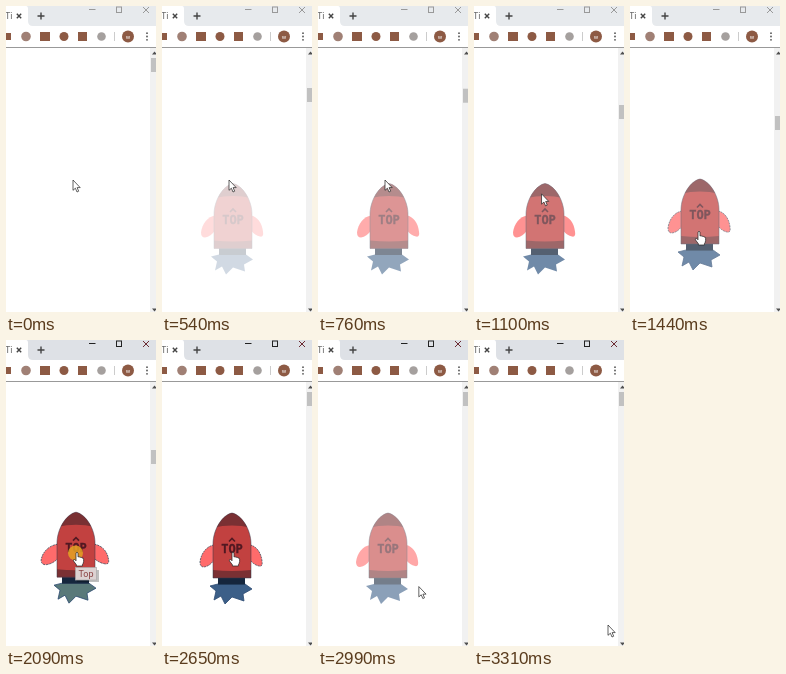
Recreate the animation shown at these times as an HTML page. Size 150 px wide and 306 px high, loop 3.43 s.

```html
<!DOCTYPE html>
<html lang="en">
<head>
<meta charset="utf-8">
<title>Back to top rocket</title>
<style>
  html, body { margin: 0; width: 100%; height: 100%; overflow: hidden; background: #fff; }
  svg { display: block; width: 150px; height: 306px; }
  .ui { font-family: Roboto, sans-serif; }
  .top { font: bold 12px "DejaVu Sans Mono", monospace; }
  .line { fill: none; stroke-width: 1; }
  .bold { fill: none; stroke: #444; stroke-width: 1.4; }
  .wing { fill: #ff6b6b; stroke-width: .7; stroke-dasharray: 2 .8; }
</style>
</head>
<body>
<svg viewBox="0 0 150 306">
  <defs>
    <path id="body" d="M51 238V204C51 190 60 175 70 173C80 175 89 190 89 204V238Z"/>
    <clipPath id="hull"><use href="#body"/></clipPath>
  </defs>
  <rect width="150" height="306" fill="#fff"/>

  <!-- browser bar -->
  <rect id="strip" width="150" height="20"/>
  <path d="M0 0H20Q22 0 22 3V15Q22 20 27 20H0Z" fill="#fff"/>
  <text class="ui" x="-1" y="13" font-size="9" fill="#666">Ti</text>
  <path class="bold" d="M10.8 7.8L15.2 12.2M15.2 7.8L10.8 12.2"/>
  <path class="bold" d="M31.5 10H38.5M35 6.5V13.5"/>
  <g id="controls" class="line">
    <path d="M83 3.5H89.5"/>
    <rect x="110.5" y="1" width="5" height="5.5"/>
    <path id="close" d="M137 1L143 7M143 1L137 7"/>
  </g>
  <g fill="#8d5a44">
    <rect x="-3" y="27" width="8" height="7"/>
    <circle cx="20" cy="30.5" r="4.8" fill="#a08075"/>
    <rect x="34" y="26" width="10" height="9"/>
    <circle cx="58" cy="30.5" r="4.5"/>
    <rect x="72" y="26" width="9" height="9"/>
    <circle cx="95.5" cy="30.5" r="4.3" fill="#a5a09e"/>
    <circle cx="122" cy="30.5" r="6"/>
  </g>
  <path class="line" d="M108.5 26V35" stroke="#ccc"/>
  <text class="ui" x="122" y="32.5" font-size="6" text-anchor="middle" fill="#fff">w</text>
  <g fill="#555">
    <circle cx="141" cy="27.2" r=".9"/><circle cx="141" cy="30.5" r=".9"/><circle cx="141" cy="33.8" r=".9"/>
  </g>
  <path class="line" d="M0 41.5H150" stroke="#999"/>

  <!-- scrollbar -->
  <rect x="144" y="42" width="6" height="264" fill="#f1f1f1"/>
  <path d="M146 48.5L148.5 45.5L151 48.5ZM146 302.5L148.5 305.5L151 302.5Z" fill="#505050"/>
  <rect id="thumb" x="145" width="5" height="14" fill="#c1c1c1"/>

  <g id="rocket">
    <path id="flame" stroke-width=".8"
      d="M56 244L48 246L54 251L52 260L59 256L63 264L70 257L82 261L81 254L90 249L83 244Z"/>
    <rect x="56" y="237" width="27" height="7.5" fill="#15263d"/>
    <path id="left" class="wing" d="M52 205C45 206 39 213 38 222Q38 227 42 227Q48 226 52 220Z"/>
    <path id="right" class="wing" d="M88 205C94 206 99 212 100 221Q101 227 97 226Q92 225 88 220Z"/>
    <use href="#body" fill="#c24140"/>
    <g clip-path="url(#hull)" fill="#7a3033">
      <path d="M50 172H90V188Q70 183 50 188Z"/>
      <path d="M50 230Q70 232 90 230V239H50Z"/>
    </g>
    <use href="#body" fill="none" stroke="#33394a" stroke-width=".5"/>
    <path class="line" d="M67 201.5L70 198.5L73 201.5" stroke="#521922" style="stroke-width:1.6"/>
    <text class="top" x="70" y="213" text-anchor="middle" fill="#521922" stroke="#521922" stroke-width=".3">TOP</text>
  </g>

  <circle id="press" cx="69.5" cy="213" r="7.5" fill="#e5a323" opacity=".85"/>
  <g id="tip">
    <rect x="71" y="230" width="22" height="12" fill="#000" opacity=".25"/>
    <rect x="69.5" y="227.5" width="21" height="12.5" fill="#dcd2d2" stroke="#aaa" stroke-width=".7"/>
    <text class="ui" x="80" y="237" font-size="9" text-anchor="middle" fill="#8a4040">Top</text>
  </g>
  <g id="cursor" fill="#fff" stroke="#222" stroke-width=".7" stroke-linejoin="round">
    <path id="arrow" d="M0 0V10.3L2.4 8.2L4 12L5.7 11.2L4.1 7.6H7.2Z"/>
    <path id="hand" d="M-1 1Q0-.6 1 1V5Q2.2 4 3 5.4Q4.2 4.6 5 6Q6.6 5.6 6.6 7.2V9.5Q6.4 11.5 5.4 12.8V14H-.6V12.8L-3.6 8.8Q-3.8 7-2.2 7.6L-1 8.8Z"/>
  </g>
</svg>
<script>
const LOOP = 3430, STEPS = 31, STEP = LOOP / STEPS;

const $ = id => document.getElementById(id);
const set = (id, name, value) => $(id).setAttribute(name, value);
const show = (id, on) => set(id, "visibility", on ? "visible" : "hidden");
const ramp = (t, from, to) => Math.min(1, Math.max(0, (t - from) / (to - from)));
const ease = (t, from, to) => { const p = ramp(t, from, to); return p * p * (3 - 2 * p); };
const mix = (a, b, p) => a + (b - a) * p;
const rgb = (a, b, p) => `rgb(${a.map((v, i) => Math.round(mix(v, b[i], p)))})`;

function drawBrowser(t) {
  const focused = t > 1980;
  set("strip", "fill", focused ? "#dee1e6" : "#e7eaed");
  set("controls", "stroke", focused ? "#222" : "#999");
  set("close", "stroke", focused ? "#6b2b33" : "#999");
  // Two scrolls down, then one back to the top
  set("thumb", "y", 52 + 30 * ramp(t, 0, 430) + 28 * ramp(t, 760, 1330) - 58 * ease(t, 2210, 2640));
}

function drawRocket(t, hover) {
  const flap = hover && t > 1400 ? (1 - Math.cos((t - 1440) * Math.PI / 202)) / 2 : 0;
  const lift = ease(t, 1150, 1400);
  const shown = .73 * ramp(t, 393, 898) + .27 * ramp(t, 1440, 1900);
  set("rocket", "transform", `translate(${1 - lift} ${4.5 * (1 - lift) - flap})`);
  set("rocket", "opacity", shown * (1 - ramp(t, 2780, 3290)));

  // Wings stretch sideways from their roots
  const spread = `scale(${1 + .25 * flap} ${1 - .08 * flap})`;
  set("left", "transform", `translate(52 205) ${spread} translate(-52 -205)`);
  set("right", "transform", `translate(88 205) ${spread} translate(-88 -205)`);
  for (const id of ["left", "right"]) set(id, "stroke", hover ? "#2c3e50" : "none");
  set("flame", "fill", rgb([60, 95, 136], [95, 127, 118], flap));
  set("flame", "stroke", hover ? "#2b4a72" : "none");
}

function drawPointer(t, hover) {
  const enter = ease(t, 990, 1330), aim = ease(t, 1540, 1880), leave = ease(t, 2780, 3210);
  const x = 67 + 2 * enter + 2 * aim + 63 * leave;
  const y = 174 + 51 * enter - 13 * aim + 73 * leave;
  set("cursor", "transform", `translate(${x} ${y})`);
  show("hand", hover);
  show("arrow", !hover);
  show("tip", t > 1870 && t < 2310);
  show("press", t > 2080 && t < 2310);
}

function draw(t) {
  const hover = t > 1200 && t < 2950;
  drawBrowser(t);
  drawRocket(t, hover);
  drawPointer(t, hover);
}

const start = performance.now();
function loop() {
  const t = (performance.now() - start) % LOOP;
  // The picture advances in even steps, slightly ahead of the clock
  const step = Math.min(STEPS - 1, Math.floor((t + 15) / STEP));
  draw(step * STEP);
  requestAnimationFrame(loop);
}
loop();
</script>
</body>
</html>
```
